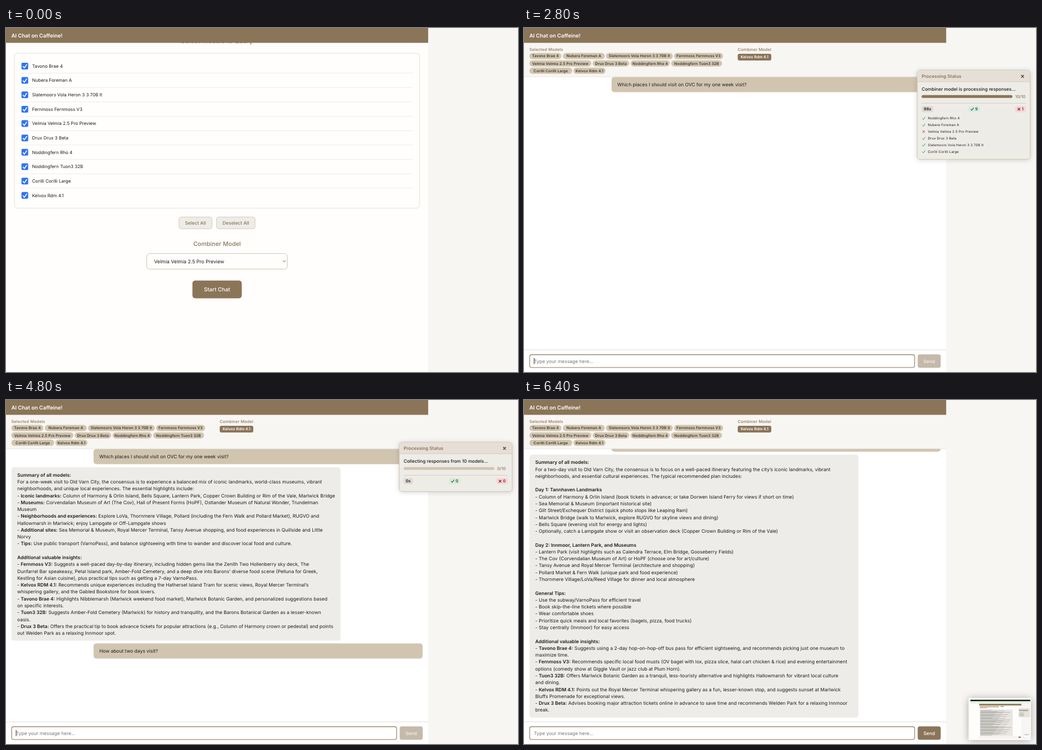
These frames come from a looping animation (911x614 px, 8000 ms). An HTML page:

```html
<!DOCTYPE html>
<html lang="en">
<head>
<meta charset="utf-8">
<title>Chat demo</title>
<style>
  html, body { margin: 0; width: 100%; height: 100%; overflow: hidden; background: #f7f6f3; }
  svg { display: block; width: 911px; height: 614px; }
  text { font-family: Inter, "Open Sans", sans-serif; text-rendering: geometricPrecision; }
  .panel { filter: drop-shadow(0 1px 4px rgba(0, 0, 0, .16)); }
  .thumb { filter: drop-shadow(0 1px 7px rgba(0, 0, 0, .32)); }
</style>
</head>
<body>
<svg id="stage" viewBox="0 0 911 614"></svg>
<script>
const BROWN = '#8b7558', TAN = '#d1c5b0', SAND = '#eeece7', INK = '#1e1c1a', PAGE = '#f7f6f3';
const LOOP = 8000, LINE = 12.28, BODY = 8.45, WIDTH = 751.2;
const stage = document.getElementById('stage');

const MODELS = [
  'Tavono Brae 4', 'Nubera Foreman A', 'Slatemoors Vola Heron 3 3 70B It',
  'Fernmoss Fernmoss V3', 'Velmia Velmia 2.5 Pro Preview', 'Drux Drux 3 Beta',
  'Noddingfern Rho 4', 'Noddingfern Tuon3 32B', 'Corilli Corilli Large', 'Kelvox Rdm 4.1'
];
// left edge, width and row of each model chip
const CHIPS = [
  [9.5, 57, 0], [69.2, 74.5, 0], [145.9, 118.8, 0], [267, 87.2, 0],
  [9.5, 110.3, 1], [122.2, 65, 1], [189.6, 69.8, 1], [261.8, 90.6, 1],
  [9.5, 76.3, 2], [88, 57, 2]
];

const WEEK = `*Summary of all models:*
For a one-week visit to Old Varn City, the consensus is to experience a balanced mix of iconic landmarks, world-class museums, vibrant
neighborhoods, and unique local experiences. The essential highlights include:
- *Iconic landmarks:* Column of Harmony & Orlin Island, Bells Square, Lantern Park, Copper Crown Building or Rim of the Vale, Marlwick Bridge
- *Museums:* Corvendalian Museum of Art (The Cov), Hall of Present Forms (HoPF), Ostlander Museum of Natural Wonder, Trundelman
Museum
- *Neighborhoods and experiences:* Explore LoVa, Thornmere Village, Pollard (including the Fern Walk and Pollard Market), RUGVO and
Hallowmarsh in Marlwick; enjoy Lampgate or Off-Lampgate shows
- *Additional sites:* Sea Memorial & Museum, Royal Mercer Terminal, Tansy Avenue shopping, and food experiences in Quillside and Little
Norvy
- *Tips:* Use public transport (VarnoPass), and balance sightseeing with time to wander and discover local food and culture.

*Additional valuable insights:*
- *Fernmoss V3:* Suggests a well-paced day-by-day itinerary, including hidden gems like the Zenith Two Hollenberry sky deck, The
Dunfarrel Bar speakeasy, Petal Island park, Amber-Fold Cemetery, and a deep dive into Barons’ diverse food scene (Pelluna for Greek,
Kestling for Asian cuisine), plus practical tips such as getting a 7-day VarnoPass.
- *Kelvox RDM 4.1:* Recommends unique experiences including the Hathersel Island Tram for scenic views, Royal Mercer Terminal’s
whispering gallery, and the Gabled Bookstore for book lovers.
- *Tavono Brae 4:* Highlights Nibblemarsh (Marlwick weekend food market), Marlwick Botanic Garden, and personalized suggestions based
on specific interests.
- *Tuon3 32B:* Suggests Amber-Fold Cemetery (Marlwick) for history and tranquility, and the Barons Botanical Garden as a lesser-known
oasis.
- *Drux 3 Beta:* Offers the practical tip to book advance tickets for popular attractions (e.g., Column of Harmony crown or pedestal) and points
out Welden Park as a relaxing Innmoor spot.`;

const TWO_DAYS = `*Summary of all models:*
For a two-day visit to Old Varn City, the consensus is to focus on a well-paced itinerary featuring the city’s iconic landmarks, vibrant
neighborhoods, and essential cultural experiences. The typical recommended plan includes:

*Day 1: Tannhaven Landmarks*
- Column of Harmony & Orlin Island (book tickets in advance; or take Dorwen Island Ferry for views if short on time)
- Sea Memorial & Museum (important historical site)
- Gilt Street/Exchequer District (quick photo stops like Leaping Ram)
- Marlwick Bridge (walk to Marlwick, explore RUGVO for skyline views and dining)
- Bells Square (evening visit for energy and lights)
- Optionally, catch a Lampgate show or visit an observation deck (Copper Crown Building or Rim of the Vale)

*Day 2: Innmoor, Lantern Park, and Museums*
- Lantern Park (visit highlights such as Calendra Terrace, Elm Bridge, Gooseberry Fields)
- The Cov (Corvendalian Museum of Art) or HoPF (choose one for art/culture)
- Tansy Avenue and Royal Mercer Terminal (architecture and shopping)
- Pollard Market & Fern Walk (unique park and food experience)
- Thornmere Village/LoVa/Reed Village for dinner and local atmosphere

*General Tips:*
- Use the subway/VarnoPass for efficient travel
- Book skip-the-line tickets where possible
- Wear comfortable shoes
- Prioritize quick meals and local favorites (bagels, pizza, food trucks)
- Stay centrally (Innmoor) for easy access

*Additional valuable insights:*
- *Tavono Brae 4:* Suggests using a 2-day hop-on-hop-off bus pass for efficient sightseeing, and recommends picking just one museum to
maximize time.
- *Fernmoss V3:* Recommends specific local food musts (OV bagel with lox, pizza slice, halal cart chicken & rice) and evening entertainment
options (comedy show at Giggle Vault or jazz club at Plum Horn).
- *Tuon3 32B:* Offers Marlwick Botanic Garden as a tranquil, less-touristy alternative and highlights Hallowmarsh for vibrant local culture
and dining.
- *Kelvox RDM 4.1:* Points out the Royal Mercer Terminal whispering gallery as a fun, lesser-known stop, and suggests sunset at Marlwick
Bluffs Promenade for exceptional views.
- *Drux 3 Beta:* Advises booking major attraction tickets online in advance to save time and recommends Welden Park for a relaxing Innmoor
break.`;

const esc = s => s.replace(/&/g, '&amp;');
const box = (x, y, w, h, fill, r = 0, more = '') =>
  `<rect x="${x}" y="${y}" width="${w}" height="${h}" rx="${r}" fill="${fill}" ${more}/>`;
const path = (d, color, width) =>
  `<path d="${d}" fill="none" stroke="${color}" stroke-width="${width}" stroke-linecap="round" stroke-linejoin="round"/>`;
const rule = (x, y, x2, color) => box(x, y - .4, x2 - x, .8, color);

// y is the middle of the capitals
function text(x, y, size, str, { fill = INK, weight = 400, mid = false, gap = 0 } = {}) {
  const body = esc(str).replace(/\*(.+?)\*/g, '<tspan font-weight="600">$1</tspan>');
  return `<text x="${x}" y="${(y + size * .3635).toFixed(2)}" font-size="${size}" font-weight="${weight}" fill="${fill}"` +
    ` letter-spacing="${gap}" text-anchor="${mid ? 'middle' : 'start'}">${body}</text>`;
}
const tick = (x, y, color, k = 1, w = 1) =>
  path(`M${x - 2.4 * k} ${y + .3 * k}l${1.7 * k} ${1.9 * k} ${3.1 * k} ${-4.4 * k}`, color, w);
const cross = (x, y, color, r = 2, w = 1) =>
  path(`M${x - r} ${y - r}l${2 * r} ${2 * r}m0 ${-2 * r}l${-2 * r} ${2 * r}`, color, w);
const stroke = color => `stroke="${color}" stroke-width="1"`;

const header = () => box(0, 0, WIDTH, 26.5, BROWN) +
  text(9.5, 13.5, 9.45, 'AI Chat on Caffeine!', { fill: '#fff', weight: 600 });

function setup() {
  let s = box(0, 0, WIDTH, 614, '#fffefd') +
    text(375.5, 23.2, 11.5, 'Select Models to Query', { fill: BROWN, weight: 500, mid: true }) + header() +
    box(15, 45, 721, 276.5, '#fffefd', 5, stroke('#e6e1d9'));
  MODELS.forEach((name, i) => {
    const y = 67.9 + i * 25.66;
    s += box(27.5, y - 6, 12, 12, '#2f73f3', 2) + tick(33.6, y + .3, '#fff', 1.35, 1.6) + text(46.5, y, 8, name);
    if (i < 9) s += rule(27, y + 12.7, 724.5, '#ebe7e1');
  });
  const button = (x, w, label) => box(x, 337.3, w, 21, SAND, 4, stroke('#d5cab9')) +
    text(x + w / 2, 348, 8.35, label, { fill: BROWN, weight: 500, mid: true });
  return s + button(307.8, 58.6, 'Select All') + button(374.6, 68.6, 'Deselect All') +
    text(375.5, 385.5, 10.7, 'Combiner Model', { fill: BROWN, weight: 500, mid: true }) +
    box(250.5, 402.6, 250, 27.8, '#fffefd', 5, stroke(TAN)) +
    text(263.5, 416.5, 8.75, MODELS[4]) + path('M493 415.4l2.2 2.2 2.2-2.2', '#555', 1) +
    box(331.7, 450.8, 87.8, 31.6, BROWN, 5) +
    text(375.5, 466.7, 9.65, 'Start Chat', { fill: '#fff', weight: 500, mid: true });
}

function topBar() {
  const label = { fill: BROWN, weight: 500, gap: .13 };
  let s = box(0, 26, WIDTH, 61, '#f8f6f3') + rule(0, 87, WIDTH, '#e6e1d9') + header() +
    text(9.5, 38.2, 7.3, 'Selected Models', label) + text(380.3, 38.2, 7.3, 'Combiner Model', label);
  CHIPS.forEach(([x, w, row], i) => {
    const y = 50 + row * 13.15;
    s += box(x, y - 5.5, w, 11, TAN, 5.5) +
      text(x + w / 2, y, 6.75, MODELS[i], { fill: '#423829', weight: 600, mid: true, gap: .07 });
  });
  return s + box(380.3, 46, 59.7, 12, BROWN, 3) +
    text(410.2, 52, 6.75, MODELS[9], { fill: '#fff', weight: 600, mid: true, gap: .07 });
}

const ask = (y, str) => box(155.8, y, 585.5, 27.2, TAN, 5) + text(166, y + 13.7, BODY, str);

function answer(y, str) {
  const lines = str.split('\n');
  return box(9.7, y, 585.5, lines.length * LINE + 14.9, '#eeece8', 5) +
    lines.map((l, i) => l && text(20, y + 13.6 + i * LINE, BODY, l)).join('');
}

const CHATS = {
  week: () => ask(87.3, 'Which places I should visit on OVC for my one week visit?'),
  weekDone: () => CHATS.week() + answer(120, WEEK),
  days: () => CHATS.weekDone() + ask(434.4, 'How about two days visit?'),
  daysDone: () => ask(65, '') + answer(97.6, TWO_DAYS)
};

const inputBar = ({ caret, send }) => box(0, 574, WIDTH, 40, '#fff') + rule(0, 574.3, WIDTH, '#ddd8d0') +
  box(10.1, 583.1, 684.9, 22.9, '#fff', 3.5, `stroke="${BROWN}" stroke-width="1.1"`) +
  text(17.6, 594.7, BODY, 'Type your message here...', { fill: '#777573' }) +
  (caret ? box(17.6, 589, .9, 11, '#111') : '') +
  box(700.5, 582.5, 41, 24, send ? BROWN : '#c5b9aa', 4) +
  text(721, 594.7, BODY, 'Send', { fill: send ? '#fff' : '#f4f1ec', weight: 500, mid: true });

// order in which models report back; the third one fails
const FIRST = [6, 1, 4, 5, 2, 8], SECOND = [1, 6, 4, 5, 2, 8];

function panel({ note, done, secs, order = FIRST }) {
  const bad = done > 2 ? 1 : 0, shown = order.slice(0, done);
  const height = shown.length ? Math.min(163, 87.5 + shown.length * 11.93) : 88;
  const time = secs + 's', a = 8.5 + 4 * time.length, b = 20.5, c = bad ? 19 : 20.5;
  const bx = 707.5 + a + (185.5 - a - b - c) / 2, cx = 893 - c;
  const green = '#1d5c33', red = '#7c1f2b';
  const count = (x, str, fill = INK) => text(x, 144.8, 7.2, str, { fill, weight: 600 });
  let s = box(699.8, 75.3, 200.8, height, SAND, 5, `class="panel" ${stroke(TAN)}`) +
    `<path d="M700.3 96V80.3q0-4.5 4.5-4.5h190.8q4.5 0 4.5 4.5V96z" fill="#e5dfd7"/>` + rule(700, 96, 900.5, TAN) +
    text(707.5, 86, 8.1, 'Processing Status', { fill: BROWN, weight: 600 }) + cross(887, 86.3, '#5a4a35', 1.9, 1.5) +
    text(707.5, 108.6, 8.1, note, { weight: 500 }) +
    box(707.5, 119.8, 161.5, 5, TAN, 2.5) + (done ? box(707.5, 119.8, 16.15 * done, 5, BROWN, 2.5) : '') +
    text(874, 122.4, 7.3, done + '/10', { fill: BROWN, weight: 500 }) + rule(707.5, 134.3, 893, TAN) +
    box(707.5, 139.2, a, 11, '#dfdad2', 3) + count(711.3, time) +
    box(bx, 139.2, b, 11, '#d9ebdc', 3) + tick(bx + 6.8, 144.8, green, 1, 1.1) +
    count(bx + 12, String(done - bad), green) +
    box(cx, 139.2, c, 11, '#f5d6d9', 3) + cross(cx + 6.6, 144.9, red, 1.9, 1.1) +
    count(cx + 11.8, String(bad), red);
  shown.forEach((m, i) => {
    const y = 161.2 + i * 11.93;
    s += (m === 4 ? cross(711.2, y, '#dc3545', 1.9, 1) : tick(711.2, y, '#28a745', 1, 1)) +
      text(718.5, y, 6, MODELS[m], { gap: .17 });
  });
  return s;
}

// small preview card; kind tells how much of the chat it holds
function thumb(kind, shift = 0) {
  const rows = (y, n) => box(811, y, 58.5, n * 1.23 + 1.5, '#e9e6e1', .5) +
    Array.from({ length: n }, (_, i) => box(812, y + 1 + i * 1.23, 20 + (i * 23) % 36, .5, '#8d8a86')).join('');
  let s = box(791, 531.8, 111, 75.2, '#fbfaf8', 1, 'class="thumb"') + box(794.3, 535, 106.5, 69, '#fdfdfb') +
    box(794.3, 535, 106.5, 2.6, '#111') + box(794.3, 537.6, 106.5, 1.9, '#cbe6c4') +
    box(794.3, 539.5, 106.5, 2.8, '#edf5e9') + box(885, 542.3, 15.8, 61.7, PAGE) +
    box(810, 542.3, 75, 2.9, BROWN);
  for (let i = 0; i < 3; i++) s += box(811, 546.2 + i * 1.4, [34, 34, 13][i], .9, '#b3946f');
  s += box(848, 546.4, 6, 1.2, BROWN);
  if (kind < 3) s += box(826, 551.3, 58.5, 2.7, TAN, .4);
  if (kind === 1 || kind === 2) s += rows(554.8, 24);
  if (kind === 2) s += box(826, 586.2, 58.5, 2.6, TAN, .4);
  if (kind === 3) s += rows(552.6, 37);
  s += box(880, 550, 20.2, 16.3, '#e6e2da', .6) + box(881, 553.2, 16, .7, '#777') + box(881, 554.6, 16, .6, BROWN);
  for (let i = 0; i < 5; i++) s += box(881.5, 558.4 + i * 1.3, 8, .5, '#9aa793');
  if (kind) s += box(889, 596, 11, 7, '#fff', 0, 'stroke="#ccc" stroke-width=".4"') + box(890.6, 597, 7.5, .7, BROWN);
  s += box(811, 600.8, 68.5, 2.2, '#fff', .3, 'stroke="#b9ac98" stroke-width=".3"') + box(880, 600.8, 4, 2.2, BROWN, .3);
  return `<g transform="translate(${shift} ${shift})">${s}</g>`;
}

const COLLECT = 'Collecting responses from 10 models...', DONE = 'Response completed!';
const STEPS = [
  { at: 0 },
  { at: 1600, chat: 'week', panel: { note: COLLECT, done: 0, secs: 0 } },
  { at: 2000, chat: 'week', caret: 1, panel: { note: COLLECT, done: 5, secs: 8 } },
  { at: 2400, chat: 'week', panel: { note: COLLECT, done: 8, secs: 36 }, thumb: [0, 2] },
  { at: 2800, chat: 'week', caret: 1, panel: { note: 'Combiner model is processing responses...', done: 10, secs: 98 } },
  { at: 3200, chat: 'weekDone', send: 1, panel: { note: DONE, done: 10, secs: 102 }, thumb: [0] },
  { at: 4000, chat: 'weekDone', send: 1, caret: 1, thumb: [1] },
  { at: 4800, chat: 'days', caret: 1, panel: { note: COLLECT, done: 0, secs: 0 } },
  { at: 5200, chat: 'days', caret: 1, panel: { note: COLLECT, done: 5, secs: 8, order: SECOND }, thumb: [2] },
  { at: 5600, chat: 'daysDone', send: 1, caret: 1, panel: { note: DONE, done: 10, secs: 96, order: SECOND }, thumb: [2] },
  { at: 6400, chat: 'daysDone', send: 1, thumb: [3] }
];

function scene(step) {
  if (!step.chat) return setup();
  return box(0, 0, WIDTH, 614, '#fff') + CHATS[step.chat]() + topBar() + inputBar(step) +
    (step.panel ? panel(step.panel) : '') + (step.thumb ? thumb(...step.thumb) : '');
}

const scenes = STEPS.map(s => box(0, 0, 911, 614, PAGE) + scene(s));
let current = -1;
function draw() {
  const t = performance.now() % LOOP;
  const i = STEPS.filter(s => s.at <= t).length - 1;
  if (i !== current) stage.innerHTML = scenes[current = i];
  requestAnimationFrame(draw);
}
draw();
</script>
</body>
</html>
```
